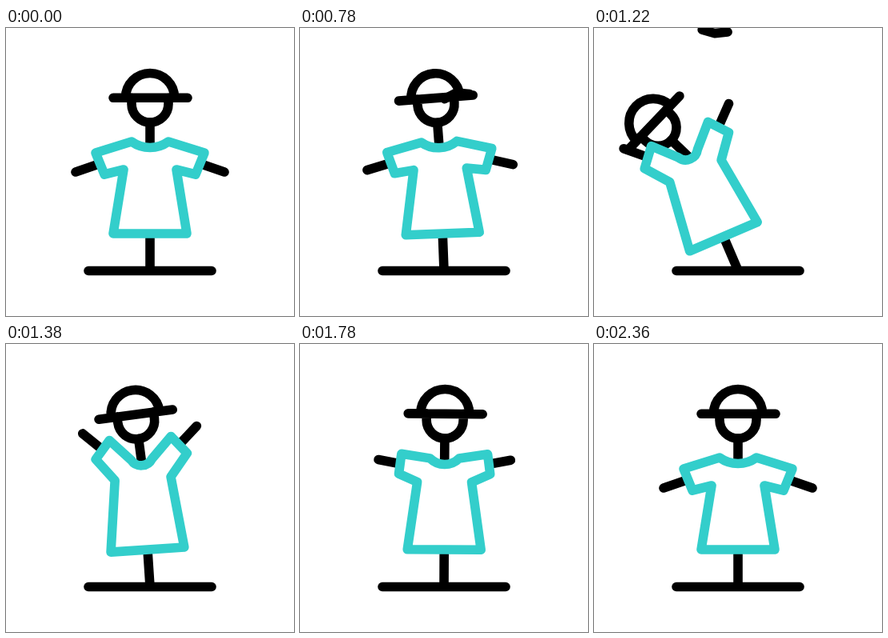
These frames come from a looping animation (360x360 px, 2.4 s). An HTML page:

```html
<!DOCTYPE html>
<html lang="en">
<head>
<meta charset="utf-8">
<title>Scarecrow</title>
<style>
  html, body { margin: 0; width: 100%; height: 100%; overflow: hidden; background: #fff; }
  svg { display: block; width: 100vw; height: 100vh; }
  path { fill: none; stroke: #000; stroke-width: 11.6; stroke-linecap: round; stroke-linejoin: round; }
  #shirt { fill: #fff; stroke: #33cecb; }
</style>
</head>
<body>
<svg viewBox="0 0 360 360">
  <path d="M103 303.5H257"/>
  <g id="body">
    <path d="M180 303V257"/>
    <path id="arms"/>
    <g id="head">
      <path d="M180 150V118"/>
      <path d="M149.5 87a30.5 30.5 0 0 1 61 0M157 87v8a23 23 0 0 0 46 0v-8M134 87.3H227"/>
    </g>
    <path id="shirt"/>
  </g>
  <path id="bird"/>
</svg>
<script>
const LOOP = 2400;
const $ = id => document.getElementById(id);
const [body, head, arms, shirt, bird] = ['body', 'head', 'arms', 'shirt', 'bird'].map($);

const mix = (a, b, k) => a + (b - a) * k;
const mid = (a, b, k = 0.5) => a.map((v, i) => mix(v, b[i], k));
const mirror = ([x, y]) => [360 - x, y];

// 0 to 1 between two times; a bias above 1 delays the move
function ease(t, from, to, bias = 1) {
  const p = Math.min(1, Math.max(0, (t - from) / (to - from)));
  return (1 - Math.cos(Math.PI * p ** bias)) / 2;
}

// where a point of the left sleeve ends up with the arm fully raised
function lifted([x, y]) {
  const a = 62 * Math.PI / 180, cx = 158.7, cy = 161.3;
  return [
    cx + (x - cx) * Math.cos(a) - (y - cy) * Math.sin(a),
    cy + (x - cx) * Math.sin(a) + (y - cy) * Math.cos(a)
  ];
}

function leftSide(raise) {
  const sleeve = p => mid(p, lifted(p), raise);
  return {
    hand: sleeve([87, 180]),
    top: sleeve([112, 156]),
    cuff: sleeve([123, 183]),
    armpit: [147 - 2 * raise, 177 - 9 * raise],
    collar: [157 + 10 * raise, 142 + 2 * raise],
    curve: [171 + 2 * raise, 152 + 2 * raise]
  };
}

function drawBody(t) {
  const tilt = -23.5 * ease(t, 580, 1200, 1.44) + 35.8 * ease(t, 1200, 1540)
    - 17.7 * ease(t, 1540, 1930) + 5.4 * ease(t, 1930, 2360);
  const raise = ease(t, 580, 1200, 1.5) - ease(t, 1540, 2010);
  const l = leftSide(raise);
  const r = Object.fromEntries(Object.entries(l).map(([k, p]) => [k, mirror(p)]));

  body.setAttribute('transform', `rotate(${tilt} 180 303)`);
  head.setAttribute('transform', `rotate(${tilt} 180 150)`);
  arms.setAttribute('d', [l, r].map(s => `M${s.hand}L${mid(s.top, s.cuff)}`).join(''));
  shirt.setAttribute('d', `M${l.collar}C${l.curve} ${r.curve} ${r.collar}` +
    `L${r.top} ${r.cuff} ${r.armpit} 226,257 134,257 ${l.armpit} ${l.cuff} ${l.top}Z`);
}

function drawBird(t) {
  const p = ease(t, 85, 630), q = 1 - p;
  const away = 74 * (Math.max(0, t - 950) / 270) ** 1.3;
  const x = mix(385, 195.5, p) - 0.6 * away;
  const y = q * q * 88 + 2 * q * p * 129 + p * p * 81 - away;
  const flap = 0.5 + 7 * Math.cos(2 * Math.PI * (t - 400) / 290 - Math.PI / 3);
  const bank = -13 + 18 * ease(t, 400, 1220, 2);
  bird.setAttribute('d', `M-16 ${flap}L0 0L16 ${flap}`);
  bird.setAttribute('transform', `translate(${x} ${y}) rotate(${bank})`);
  bird.setAttribute('visibility', t > 90 && t < 1300 ? 'visible' : 'hidden');
}

const start = performance.now();
function draw(now) {
  const t = Math.max(0, now - start) % LOOP;
  drawBody(t);
  drawBird(t);
  requestAnimationFrame(draw);
}
draw(start);
</script>
</body>
</html>
```
